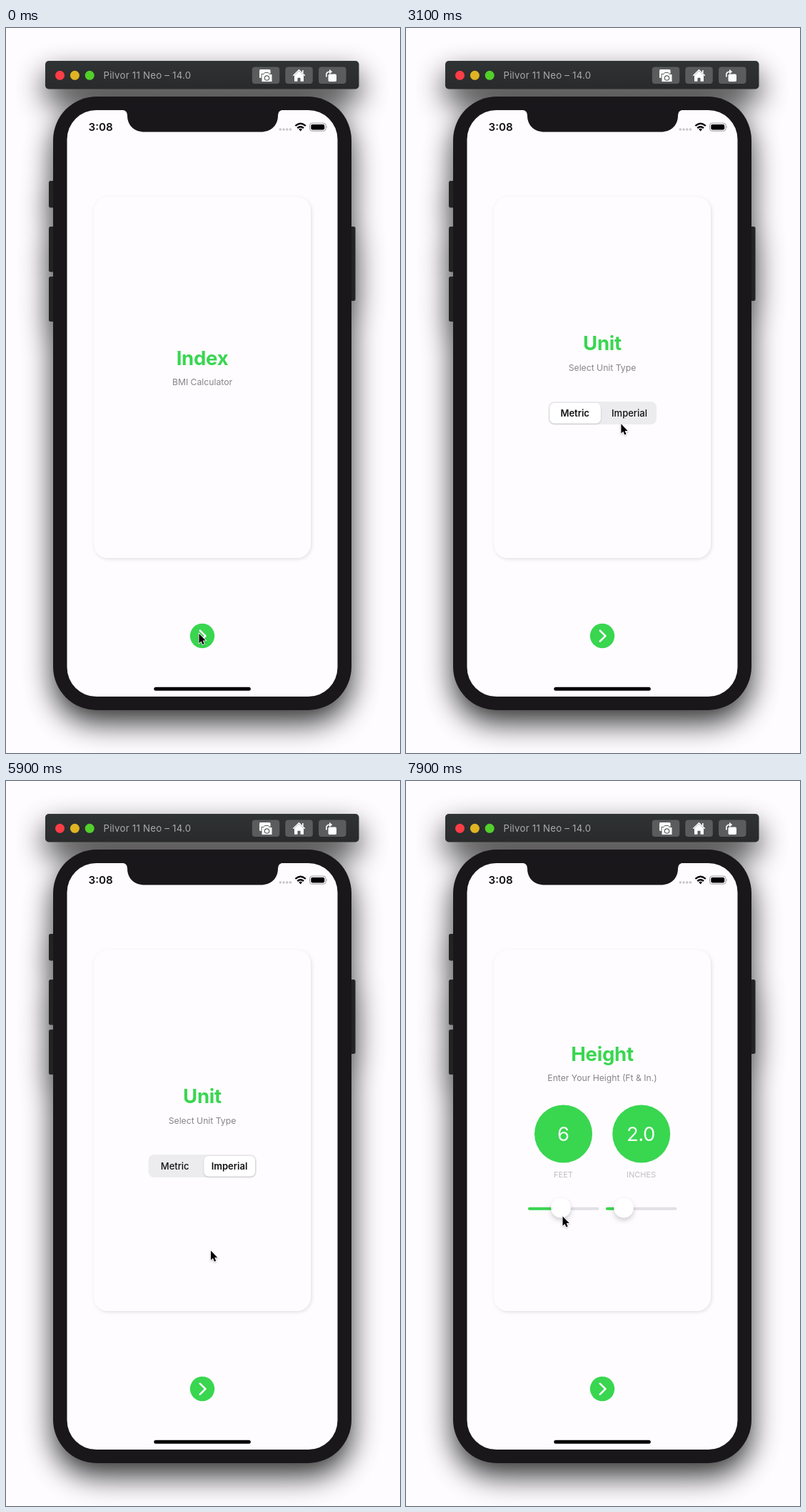
Recreate the animation shown at these times as an HTML page. Size 552 by 1015 pixels, loop 8000 ms.

```html
<!DOCTYPE html>
<html lang="en">
<head>
<meta charset="utf-8">
<title>BMI Calculator</title>
<style>
  html, body { margin: 0; width: 100%; height: 100%; overflow: hidden; background: #fefcff; }
  svg { display: block; width: 552px; height: 1015px; font-family: Inter, sans-serif; }
  .mid text { text-anchor: middle; }
  .green { fill: #39d650; }
  .title { font-size: 27.5px; font-weight: 700; letter-spacing: -.25px; fill: #39d650; }
  .sub { font-size: 12.2px; fill: #858488; }
  .seg { font-size: 13px; font-weight: 500; fill: #111; }
  .value { font-size: 27.5px; letter-spacing: -.5px; fill: #f4fff5; }
  .unit { font-size: 11px; fill: #bebdc1; }
</style>
</head>
<body>
<svg viewBox="0 0 552 1015">
  <defs>
    <filter id="blur" x="-30%" y="-30%" width="160%" height="160%"><feGaussianBlur stdDeviation="20"/></filter>
    <filter id="cardShadow" x="-10%" y="-10%" width="120%" height="120%">
      <feDropShadow dx="1.2" dy="1.5" stdDeviation="2.8" flood-opacity=".12"/>
    </filter>
    <filter id="thumbShadow" x="-40%" y="-40%" width="180%" height="200%">
      <feDropShadow dx="0" dy="1" stdDeviation="1.2" flood-opacity=".22"/>
    </filter>
    <filter id="knobShadow" x="-60%" y="-60%" width="220%" height="240%">
      <feDropShadow dx="0" dy="3.5" stdDeviation="3.5" flood-opacity=".2"/>
    </filter>
    <filter id="cursorShadow" x="-60%" y="-60%" width="220%" height="220%">
      <feDropShadow dx="0" dy="1" stdDeviation="1" flood-opacity=".3"/>
    </filter>
    <linearGradient id="bar" x2="0" y2="1">
      <stop stop-color="#303334"/><stop offset="1" stop-color="#282a2b"/>
    </linearGradient>
    <g id="sideButtons">
      <rect x="60" y="214" width="9" height="37.5" rx="2.5"/>
      <rect x="60" y="278" width="9" height="63.5" rx="2.5"/>
      <rect x="60" y="348" width="9" height="63" rx="2.5"/>
      <rect x="480" y="278" width="9.5" height="104" rx="2.5"/>
    </g>
    <rect id="body" x="66" y="96" width="418" height="859" rx="61"/>
    <rect id="barShape" x="55" y="46" width="439.5" height="39.5" rx="5"/>
    <rect id="barButton" y="54.5" width="38.5" height="23.5" rx="4" fill="#5a5c5d"/>
    <rect id="track" y="596.7" width="99.5" height="4" rx="2" fill="#e1e0e3"/>
  </defs>

  <g filter="url(#blur)" opacity=".8" transform="translate(0 18)">
    <use href="#barShape"/><use href="#sideButtons"/><use href="#body"/>
  </g>

  <!-- window bar -->
  <use href="#barShape" fill="url(#bar)"/>
  <circle cx="75.5" cy="66.3" r="6.5" fill="#fb3d46"/>
  <circle cx="96.4" cy="66.3" r="6.5" fill="#e0b423"/>
  <circle cx="117.2" cy="66.3" r="6.5" fill="#52d02a"/>
  <text x="136.5" y="71.2" font-size="13.2" letter-spacing=".25" fill="#a9aaab">Pilvor 11 Neo – 14.0</text>
  <use href="#barButton" x="344.8"/><use href="#barButton" x="391.3"/><use href="#barButton" x="438"/>
  <g fill="#fff">
    <rect x="355" y="58" width="15.5" height="12" rx="1.5"/>
    <path d="M358 64.5h3l1.5-2h5l1.5 2h4v11h-15z" stroke="#5a5c5d"/>
    <circle cx="365.5" cy="70" r="3.2" fill="none" stroke="#5a5c5d" stroke-width="1.2"/>
    <path d="M410.5 60.2l6.5 6.3v8.2h-4.5v-5h-4v5H404v-8.2z"/>
    <path d="M402.3 66.8l8.2-8 8.2 8M415.8 59v4" fill="none" stroke="#fff" stroke-width="1.6"/>
    <rect x="451.5" y="64.5" width="11.5" height="10.5" rx="1.8"/>
    <path d="M448.8 68.5v-3q0-4.3 5-4.3" fill="none" stroke="#fff" stroke-width="1.6"/>
    <path d="M453 57.8l4.2 3.4-4.2 3.4z"/>
  </g>

  <!-- phone -->
  <use href="#sideButtons" fill="#232324"/>
  <use href="#body" fill="#19171a"/>
  <rect x="85.5" y="115" width="379" height="821" rx="41" fill="#fefcff"/>
  <path d="M163 114.5q7 1 7 8c0 14 10 23 24 23H357c14 0 24-9 24-23q0-7 7-8z" fill="#19171a"/>
  <text x="115.5" y="144" font-size="15.2" font-weight="600" fill="#111">3:08</text>
  <path d="M384.3 142h15" stroke="#c8c7cb" stroke-width="3.6" stroke-linecap="round" stroke-dasharray="0 4.7"/>
  <g fill="none" stroke="#000" stroke-width="2.3">
    <path d="M405.4 137q7.2-6.6 14.4 0M408.2 140.2q4.4-4 8.8 0"/>
    <path d="M410.2 141.8q2.4-2 4.8 0l-2.4 2.6z" fill="#000" stroke="none"/>
  </g>
  <rect x="425.5" y="133.2" width="22.5" height="11" rx="3.2" fill="none" stroke="#99989c"/>
  <rect x="427.3" y="135" width="18.9" height="7.4" rx="1.8"/>
  <path d="M449 137q1.6 1.7 0 3.4z" fill="#99989c"/>
  <rect x="207.3" y="922.7" width="135.5" height="5" rx="2.5"/>

  <rect x="123" y="236.5" width="304" height="505.5" rx="20" fill="#fefcff" filter="url(#cardShadow)"/>

  <!-- pages -->
  <g id="index" class="mid">
    <text class="title" x="275" y="472">Index</text>
    <text class="sub" x="275" y="500.3">BMI Calculator</text>
  </g>
  <g id="unit" class="mid">
    <text class="title" x="275" y="451.3">Unit</text>
    <text class="sub" x="275" y="480">Select Unit Type</text>
    <rect x="199.5" y="523" width="151.5" height="32" rx="8" fill="#ececee"/>
    <rect id="thumb" y="525" width="71.5" height="28.5" rx="6.5" fill="#fff" filter="url(#thumbShadow)"/>
    <text id="metric" class="seg" x="236.7" y="543.8">Metric</text>
    <text id="imperial" class="seg" x="313" y="543.8">Imperial</text>
  </g>
  <g id="height" class="mid">
    <text class="title" x="275" y="391.5">Height</text>
    <text class="sub" x="275" y="420.2">Enter Your Height (Ft &amp; In.)</text>
    <circle class="green" cx="220.5" cy="494" r="40.5"/>
    <circle class="green" cx="329.7" cy="494" r="40.5"/>
    <text class="value" x="220.3" y="504">6</text>
    <text class="value" x="329" y="504">2.0</text>
    <text class="unit" x="220.5" y="555">FEET</text>
    <text class="unit" x="329.5" y="555">INCHES</text>
    <use href="#track" x="171"/><use href="#track" x="280"/>
    <rect class="green" x="171" y="596.7" width="46" height="4" rx="2"/>
    <rect class="green" x="280" y="596.7" width="25" height="4" rx="2"/>
    <g fill="#fff" filter="url(#knobShadow)">
      <circle cx="217" cy="597.6" r="13.7"/><circle cx="305" cy="597.6" r="13.7"/>
    </g>
  </g>

  <circle class="green" cx="275" cy="851" r="17.2"/>
  <path d="M271.8 843.6l7.6 7.5-7.6 7.5" fill="none" stroke="#fff" stroke-width="2.6" stroke-linecap="round" stroke-linejoin="round"/>

  <path id="cursor" d="M0 0V14.6L3.3 11.6 5.5 16.8 8 15.7 5.8 10.6H10.3Z" stroke="#fff" stroke-width="1.7" paint-order="stroke" filter="url(#cursorShadow)"/>
</svg>
<script>
  const LOOP = 8000, STEP = 100, FADE = 350;
  const $ = id => document.getElementById(id);

  // Eased progress from 0 to 1, beginning at start.
  function ease(t, start, duration) {
    const u = Math.min(1, Math.max(0, (t - start) / duration));
    return u * u * (3 - 2 * u);
  }

  const home = { x: 270.5, y: 848 };
  const moves = [
    { start: 0, end: 400, x: 273.5, y: 852 },     // rest on the button
    { start: 2100, end: 2300, x: 267, y: 851 },
    { start: 2400, end: 3160, x: 302, y: 549 },   // up to Imperial
    { start: 4200, end: 4800, x: 263.5, y: 541.5 }, // drag to Metric
    { start: 4900, end: 5350, x: 296, y: 541 },   // and back
    { start: 5350, end: 6670, x: 272, y: 851 },   // down to the button
    { start: 7000, end: 7850, x: 219.5, y: 609.5 } // up to the slider
  ];

  function pointerAt(t) {
    let { x, y } = home;
    for (const move of moves) {
      const k = ease(t, move.start, move.end - move.start);
      x += (move.x - x) * k;
      y += (move.y - y) * k;
    }
    return { x, y };
  }

  function draw() {
    const t = Math.floor(performance.now() % LOOP / STEP) * STEP;
    const { x, y } = pointerAt(t);
    const drag = ease(t, 4200, 550) - ease(t, 4900, 450);
    const side = ease(t, 3300, 400) - .96 * drag;
    const unit = ease(t, 900, FADE);
    const height = ease(t, 6650, FADE);

    $('cursor').setAttribute('transform', `translate(${x} ${y}) scale(.9)`);
    $('thumb').setAttribute('x', 201.3 + 76.2 * side);
    $('metric').style.fontWeight = side < .5 ? 600 : 500;
    $('imperial').style.fontWeight = side < .5 ? 500 : 600;
    $('index').style.opacity = 1 - unit;
    $('unit').style.opacity = unit * (1 - height);
    $('height').style.opacity = height;
    requestAnimationFrame(draw);
  }
  draw();
</script>
</body>
</html>
```
